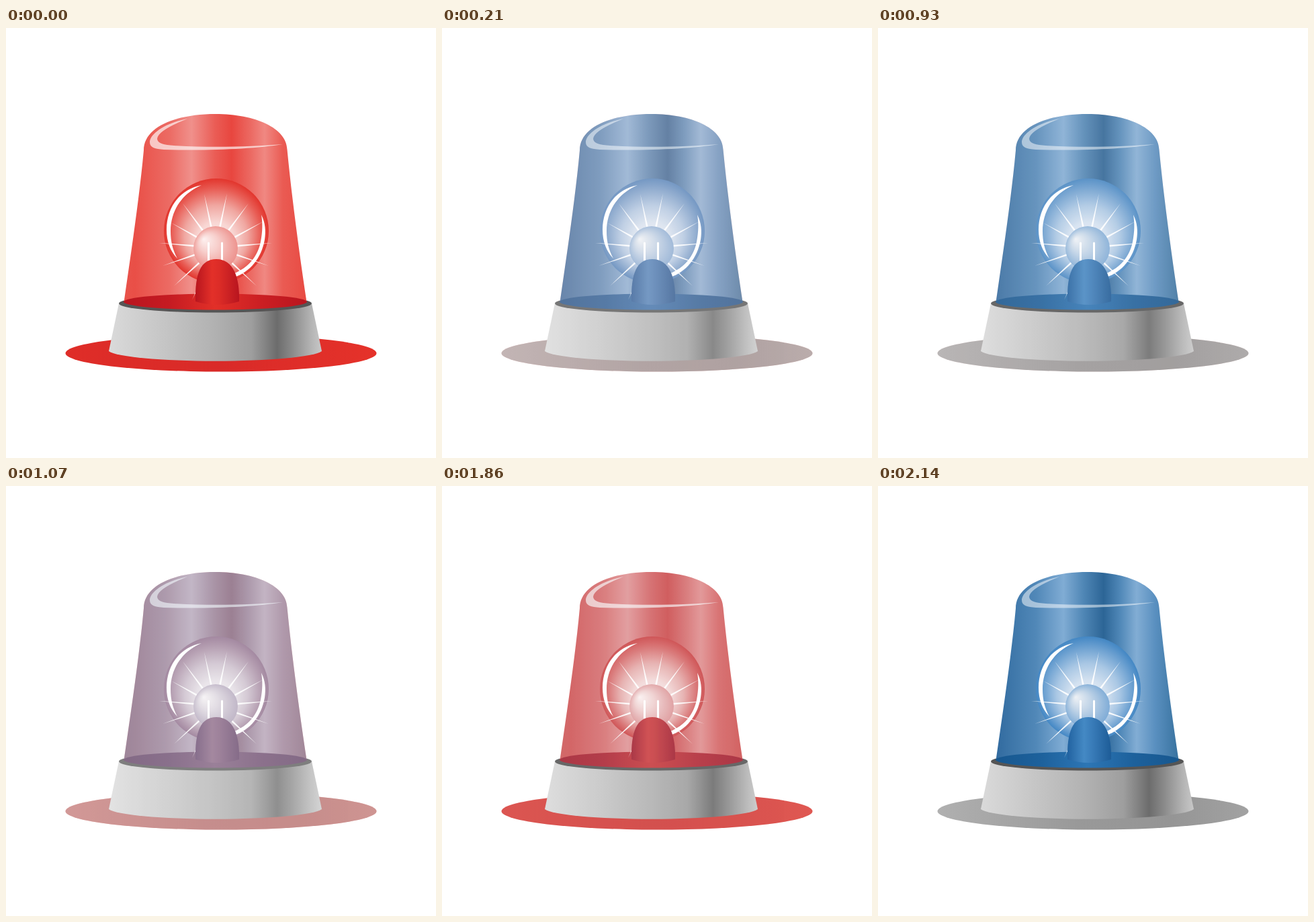
Animation, 640 px wide and 640 px high, one loop 2780 ms. Source, as an HTML page:

```html
<!DOCTYPE html>
<html lang="en">
<head>
<meta charset="utf-8">
<title>Beacon</title>
<style>
  @property --mix { syntax: "<number>"; inherits: true; initial-value: 0; }
  html, body { margin: 0; width: 100%; height: 100%; overflow: hidden; background: #fff; }
  svg { display: block; width: 100vw; height: 100vh; animation: blink 2780ms step-end infinite; }
  #red { opacity: calc(1 - var(--mix)); }
  #blue { opacity: var(--mix); }
  @keyframes blink {
    0% { --mix: 0; }
    2.51% { --mix: .28; }
    5.03% { --mix: .5; }
    7.55% { --mix: .72; }
    10.43% { --mix: 1; }
    33.45% { --mix: .87; }
    35.97% { --mix: .65; }
    38.48% { --mix: .43; }
    41% { --mix: .22; }
    43.52% { --mix: 0; }
    66.9% { --mix: .13; }
    69.42% { --mix: .35; }
    71.94% { --mix: .57; }
    74.46% { --mix: .78; }
    76.97% { --mix: 1; }
    100% { --mix: 1; }
  }
</style>
</head>
<body>
<svg id="stage" viewBox="0 0 640 640"></svg>
<script>
const themes = {
  red: {
    floor: "0 #df2d28, .5 #d92a28, 1 #e5322a",
    dome: "0 #e9534b, .06 #e94f47, .25 #ec6b64, .37 #f0908b, .5 #ea5c55, .59 #e8463f, .7 #ec6c65, .77 #f08882, .87 #ea5b53, 1 #e84a42",
    globe: "0 #fdf3f2, .35 #f8d6d3, .6 #f0a7a1, .85 #e85c54, 1 #e2352d",
    core: "0 #fdf1f0, .4 #f7cfcc, 1 #ec8d88",
    well: "0 #b9151f, .25 #c51b22, .5 #e23028, .75 #cb1f23, 1 #b9151f",
    stem: "0 #b7151e, .38 #e33029, .55 #dc2c27, 1 #b8151f",
    shine: .66
  },
  blue: {
    floor: "0 #b0b0b0, .45 #999, .75 #959595, 1 #a2a2a2",
    dome: "0 #316a9f, .06 #3a73a6, .22 #5188b8, .37 #80acd4, .48 #4f86b5, .59 #2c6596, .68 #5088b8, .77 #82add4, .87 #5a90c0, 1 #38729f",
    globe: "0 #f0f4f9, .35 #d3e1f0, .6 #a9c7e4, .85 #6a9fd0, 1 #4387c4",
    core: "0 #eef1f5, .4 #c4d6e8, 1 #79a8d5",
    well: "0 #17578f, .25 #1d619c, .5 #2d76b5, .75 #1d619c, 1 #17578f",
    stem: "0 #2162a0, .38 #4489c4, .55 #3a7dba, 1 #1d5c97",
    shine: .5
  }
};

const base = "0 #dadada, .3 #c2c2c2, .5 #b1b1b1, .67 #9e9e9e, .74 #818181, .79 #6c6c6c, .86 #8a8a8a, .95 #b4b4b4, 1 #c8c8c8";

const tips = [
  [228, 320], [233, 354], [250, 384], [277, 405], [246, 290], [263, 261], [295, 247],
  [329, 246], [361, 261], [383, 288], [396, 320], [391, 354], [373, 384]
];

const stops = list => list.split(", ").map(s => {
  const [at, color] = s.split(" ");
  return `<stop offset="${at}" stop-color="${color}"/>`;
}).join("");

const linear = (id, list) => `<linearGradient id="${id}">${stops(list)}</linearGradient>`;

const radial = (id, list, cx, cy, r, fx, fy) =>
  `<radialGradient id="${id}" gradientUnits="userSpaceOnUse" cx="${cx}" cy="${cy}" r="${r}" fx="${fx}" fy="${fy}">${stops(list)}</radialGradient>`;

// Spike that narrows from the core to its tip
function ray([x, y]) {
  const cx = 312, cy = 327, d = Math.hypot(x - cx, y - cy);
  const ux = (x - cx) / d, uy = (y - cy) / d;
  const bx = cx + ux * 31, by = cy + uy * 31, w = 1.4;
  return `M${bx - uy * w} ${by + ux * w}L${x} ${y}L${bx + uy * w} ${by - ux * w}Z`;
}

function lamp(name, t) {
  const fill = part => `fill="url(#${name}-${part})"`;
  return `<g id="${name}">
    <defs>
      ${["floor", "dome", "well", "stem"].map(p => linear(`${name}-${p}`, t[p])).join("")}
      ${linear(`${name}-base`, base)}
      ${radial(`${name}-globe`, t.globe, 313, 302, 78, 312, 324)}
      ${radial(`${name}-core`, t.core, 312, 328, 36, 294, 314)}
    </defs>
    <ellipse cx="320" cy="484" rx="231.5" ry="27.5" ${fill("floor")}/>
    <path d="M168 410L153 481A160 17 0 0 0 470 481L455 410Z" ${fill("base")}/>
    <ellipse cx="311.5" cy="410" rx="143.5" ry="13.5" fill="#555"/>
    <path d="M175.5 408C186 336 199 248 205 182C205 147 253 128 312 128C371 128 418 149 418.5 181C425 248 436 332 447.5 408Z" ${fill("dome")}/>
    <path d="M270 135C235 142 214 158 214 170C214 178 222 180 235 181C300 183 370 180 412 173C365 177 300 178 250 175C235 174 226 172 225 165C226 155 245 145 270 135Z" fill="#fff" opacity="${t.shine}"/>
    <circle cx="313" cy="302" r="78" ${fill("globe")}/>
    <ellipse cx="311.5" cy="407.5" rx="136.5" ry="12" ${fill("well")}/>
    <g fill="#fff">
      <path d="M291 234C258 240 239 268 239 300C239 318 245 333 255 343C248 330 245 318 245 302C245 272 262 246 291 234Z"/>
      <path d="M380 278C386 290 387 302 385 315C380 343 363 363 340 371L340 365C360 357 375 340 379 318C382 303 382 290 380 278Z"/>
      <path d="${tips.map(ray).join("")}" opacity=".9"/>
    </g>
    <circle cx="312" cy="328" r="33" ${fill("core")}/>
    <path d="M301.5 320V350M321.5 320V350" stroke="#fff" stroke-width="3" stroke-linecap="round"/>
    <path d="M282 407C281 365 290 344 313 344C338 344 348 370 347 407Q314 417 282 407Z" ${fill("stem")}/>
  </g>`;
}

document.getElementById("stage").innerHTML =
  Object.entries(themes).map(([name, t]) => lamp(name, t)).join("");
</script>
</body>
</html>
```
